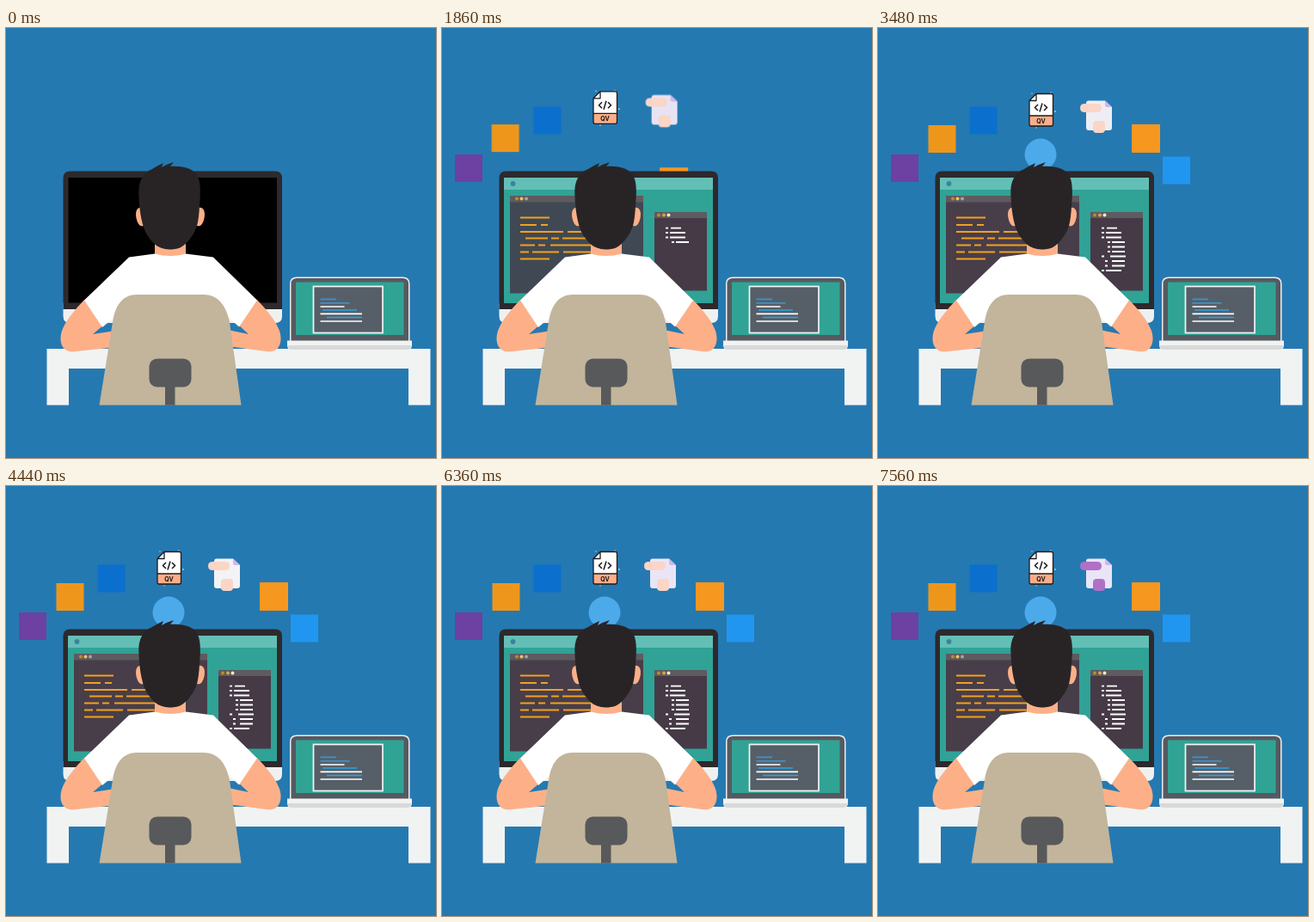
Write an HTML page that moves like this. It is 500 px wide and 500 px high and loops after 7620 ms.

```html
<!DOCTYPE html>
<html lang="en">
<head>
<meta charset="utf-8">
<title>Developer at a desk</title>
<style>
  html, body { margin: 0; width: 100%; height: 100%; overflow: hidden; background: #2579b1; }
  svg { display: block; width: 100vw; height: 100vh; }

  .loop, .icon { animation: 7620ms linear infinite; }

  /* Screen content */
  .desktop { animation-name: wake; }
  .win { transform-box: fill-box; transform-origin: center; }
  .left { animation-name: open-left; }
  .right { animation-name: open-right; }
  .code { animation-name: scroll-up; stroke: #f3a01f; stroke-width: 2; fill: none; }
  .dim { animation-name: colour-in; }
  .pane { animation-name: tint; }
  .typed { animation-name: type; animation-timing-function: steps(10); fill: none; stroke: #fff; stroke-width: 2; }

  @keyframes wake { 0%, 1.6% { opacity: 0 } 5.5%, 100% { opacity: 1 } }
  @keyframes open-left {
    0%, 3.9% { opacity: 0; transform: scale(.6) }
    8%, 100% { opacity: 1; transform: none }
  }
  @keyframes open-right {
    0%, 7% { opacity: 0; transform: scale(.6) }
    11%, 100% { opacity: 1; transform: none }
  }
  @keyframes scroll-up {
    0%, 10% { opacity: 0; transform: translateY(40px) }
    16.7%, 100% { opacity: 1; transform: none }
  }
  @keyframes colour-in { 0%, 14.5% { stroke: #bdb6ac } 19%, 100% { stroke: #f3a01f } }
  @keyframes tint { 0%, 15% { fill: #444a50 } 34% { fill: #3c4856 } 45%, 100% { fill: #483e4a } }
  @keyframes type { 0%, 20% { clip-path: inset(0 0 100% 0) } 31%, 100% { clip-path: inset(0) } }

  /* Icons spring out from behind the monitor: --x, --y point back to the start */
  .icon { --x: 0px; --y: 80px; }
  .i1 { --x: 90px; --y: 55px; animation-name: fly1; }
  .i2 { --x: 56px; --y: 56px; animation-name: fly2; }
  .i3 { --x: 45px; --y: 78px; animation-name: fly3; }
  .i4 { animation-name: fly4; }
  .i5 { --x: -20px; animation-name: fly5; }
  .i6 { --x: -50px; --y: 60px; animation-name: fly6; }
  .i7 { --x: -85px; --y: 50px; animation-name: fly7; }
  .i8 { animation-name: fly7; }

  /* Shared poses */
  .icon {
    --start: translate(var(--x), var(--y));
    --pass: translate(calc(var(--x) * -.08), calc(var(--y) * -.08));
    --peak: translate(calc(var(--x) * -.17), calc(var(--y) * -.17));
    --back: translate(calc(var(--x) * .03), calc(var(--y) * .03));
    --swing: translate(calc(var(--x) * -.03), calc(var(--y) * -.03));
  }
  @keyframes fly1 {
    0%, 11.4% { transform: var(--start); visibility: hidden }
    11.5% { visibility: visible }
    14.2% { transform: var(--pass) } 15% { transform: var(--peak) }
    18.4% { transform: var(--back) } 22.3% { transform: var(--swing) }
    24.4%, 100% { transform: translate(0, 0); visibility: visible }
  }
  @keyframes fly2 {
    0%, 12.5% { transform: var(--start); visibility: hidden }
    12.6% { visibility: visible }
    15.3% { transform: var(--pass) } 16.1% { transform: var(--peak) }
    19.5% { transform: var(--back) } 23.4% { transform: var(--swing) }
    25.5%, 100% { transform: translate(0, 0); visibility: visible }
  }
  @keyframes fly3 {
    0%, 15.5% { transform: var(--start); visibility: hidden }
    15.6% { visibility: visible }
    18.3% { transform: var(--pass) } 19.1% { transform: var(--peak) }
    22.5% { transform: var(--back) } 26.4% { transform: var(--swing) }
    28.5%, 100% { transform: translate(0, 0); visibility: visible }
  }
  @keyframes fly4 {
    0%, 18.5% { transform: var(--start); visibility: hidden }
    18.6% { visibility: visible }
    21.3% { transform: var(--pass) } 22.1% { transform: var(--peak) }
    25.5% { transform: var(--back) } 29.4% { transform: var(--swing) }
    31.5%, 100% { transform: translate(0, 0); visibility: visible }
  }
  @keyframes fly5 {
    0%, 21.6% { transform: var(--start); visibility: hidden }
    21.7% { visibility: visible }
    24.4% { transform: var(--pass) } 25.2% { transform: var(--peak) }
    28.6% { transform: var(--back) } 31.5% { transform: var(--swing) }
    33%, 100% { transform: translate(0, 0); visibility: visible }
  }
  @keyframes fly6 {
    0%, 24% { transform: var(--start); visibility: hidden }
    24.1% { visibility: visible }
    26.8% { transform: var(--pass) } 27.6% { transform: var(--peak) }
    30.5% { transform: var(--back) } 32.5% { transform: var(--swing) }
    33.6%, 100% { transform: translate(0, 0); visibility: visible }
  }
  @keyframes fly7 {
    0%, 31.1% { transform: var(--start); visibility: hidden }
    31.2% { visibility: visible }
    33.9% { transform: var(--pass) } 34.7% { transform: var(--peak) }
    38.1% { transform: var(--back) } 40.5% { transform: var(--swing) }
    42%, 100% { transform: translate(0, 0); visibility: visible }
  }

  .tag { animation-name: tag; }
  .sheet { animation-name: sheet; }
  @keyframes tag {
    0%, 70% { fill: #fbd5c6; stroke: #fbd5c6 }
    72%, 76% { fill: #fbd0bd; stroke: #b98ad8 }
    80%, 94% { fill: #fbd5c6; stroke: #fbd5c6 }
    97%, 100% { fill: #b070c8; stroke: #b070c8 }
  }
  @keyframes sheet {
    0%, 36% { fill: #e7e3f3 } 50%, 62% { fill: #f3f2f4 }
    72% { fill: #ece8f6 } 84%, 100% { fill: #e9e5f6 }
  }
</style>
</head>
<body>
<svg viewBox="0 0 500 500">
  <rect width="500" height="500" fill="#2579b1"/>

  <!-- Icons -->
  <rect class="icon i1" x="15" y="147" width="32" height="32" fill="#6c41a2"/>
  <rect class="icon i2" x="58.5" y="113" width="32" height="32" fill="#ee961b"/>
  <rect class="icon i3" x="106.5" y="91.5" width="32" height="32" fill="#0b70cd"/>
  <g class="icon i4">
    <path d="M184 76.500H201.500q2 0 2 2V112q0 2-2 2H178q-2 0-2-2V84.500Z" fill="#fff"/>
    <path d="M176 102H203.500V112q0 2-2 2H178q-2 0-2-2Z" fill="#fcae88"/>
    <path d="M184 76.500H201.500q2 0 2 2V112q0 2-2 2H178q-2 0-2-2V84.500ZV84.500H176M176 102H203.500" fill="none" stroke="#1d1b1c" stroke-width="1.3" stroke-linejoin="round"/>
    <path d="M186 89l-3.500 3.500 3.500 3.500M193 89l3.500 3.500-3.500 3.500M191 87.500l-3 10" fill="none" stroke="#1d1b1c" stroke-width="1.5"/>
    <text x="189.500" y="111" text-anchor="middle" font-family="Inter, Arial, sans-serif" font-weight="700" font-size="7" fill="#1d1b1c">QV</text>
    <g fill="#e9b98f">
      <circle cx="179" cy="76" r=".8"/><circle cx="206" cy="97" r="1"/>
      <circle cx="184" cy="116" r=".8"/><circle cx="201" cy="75" r=".7"/>
    </g>
  </g>
  <g class="icon i5">
    <path class="loop sheet" d="M245 84.500H264L272 92V116q0 3-3 3H245q-3 0-3-3V87.500q0-3 3-3Z"/>
    <path d="M264 84.500L272 92H266q-2 0-2-2Z" fill="#cbb9ea"/>
    <rect class="loop tag" x="235.5" y="88.5" width="24" height="9" rx="4"/>
    <rect class="loop tag" x="250.5" y="108.5" width="13" height="13" rx="3"/>
  </g>
  <rect class="icon i6" x="295" y="112" width="33" height="33" fill="#f6971f"/>
  <rect class="icon i7" x="331" y="149.5" width="32" height="32" fill="#2196f0"/>
  <circle class="icon i8" cx="189" cy="147" r="18.5" fill="#4ca9ea"/>

  <!-- Monitor -->
  <path d="M66.500 320H321V335q0 8-8 8H74.500q-8 0-8-8Z" fill="#eff1f1"/>
  <path d="M74.500 166.500H313q8 0 8 8V327H66.500V174.500q0-8 8-8Z" fill="#2d292c"/>
  <rect x="72.5" y="174" width="242.500" height="145.500" fill="#000"/>
  <g class="loop desktop">
    <rect x="72" y="174" width="243" height="146" fill="#30a296"/>
    <rect x="72" y="174" width="243" height="14" fill="#63bfb6"/>
    <circle cx="82.5" cy="181" r="2.900" fill="#3b829a"/>
    <g class="loop win left">
      <rect class="loop pane" x="79" y="195" width="155" height="113.500"/>
      <rect x="79" y="195" width="155" height="7.500" fill="#5d5b5f"/>
      <circle cx="87" cy="198.5" r="2" fill="#c98624"/>
      <circle cx="92.5" cy="198.5" r="2" fill="#f0bf66"/>
      <circle cx="98" cy="198.5" r="2" fill="#aaa39c"/>
      <g class="loop code">
        <path class="loop dim" d="M91 220.500h34M91 229h19M91 237h50M97 244.500h26M127 244.500h9M91 268.500h34"/>
        <path d="M115 229h8M146 237h28M140 244.500h34M91 252.500h17M112 252.500h8M126 252.500h48M91 260.500h10M105 260.500h31M141 260.500h32"/>
      </g>
    </g>
    <g class="loop win right">
      <rect x="247" y="214" width="61" height="91.500" fill="#463a47"/>
      <rect x="247" y="214" width="61" height="7" fill="#5d5b5f"/>
      <circle cx="252" cy="217.5" r="2" fill="#c98624"/>
      <circle cx="258" cy="217.5" r="2" fill="#d9a24c"/>
      <circle cx="263.5" cy="217.5" r="2" fill="#f6e6c8"/>
      <path class="loop typed" d="M260 232.500h3M266 232.500h12M260 238h3M265 238h18M260 243.500h3M265 243.500h18M267 249h3M272 249h15M267 254.500h3M272 254.500h15M267 260h3M272 260h15M260 265.500h3M270 265.500h18M264 271h3M272 271h15M264 276.500h3M272 276.500h15M260 282h3M265 282h18"/>
    </g>
  </g>

  <!-- Desk -->
  <path d="M47.500 373H493.500V438.600H468V396H73V438.600H47.500Z" fill="#f1f3f3"/>

  <!-- Laptop -->
  <path d="M338 289.500H461.500q8 0 8 8V366H330V297.500q0-8 8-8Z" fill="#eceeef"/>
  <path d="M338 291H461.500q6.500 0 6.500 6.500V364H331.500V297.500q0-6.500 6.500-6.500Z" fill="#555a61"/>
  <rect x="337" y="295.5" width="125.500" height="61.500" fill="#31a395"/>
  <rect x="357.5" y="300.5" width="80.500" height="54" fill="#565f68" stroke="#f4f6f6" stroke-width="1.700"/>
  <g fill="none" stroke-width="1.700">
    <path d="M365.500 315.300h18.500M365.500 319.800h34" stroke="#4190c4"/>
    <path d="M368 328h40M373 336.500h41" stroke="#29a3e6"/>
    <path d="M365.500 324h28M365.500 332.300h48.500M365.500 341h48.500" stroke="#fff"/>
  </g>
  <path d="M327 363.500H472V369q0 5-5 5H332q-5 0-5-5Z" fill="#f1f2f2"/>
  <path d="M327.500 369H471.500q-1 5-5 5H332q-4 0-4.500-5Z" fill="#d8dada"/>

  <!-- Arms, neck and shirt -->
  <g fill="#fdb088">
    <path d="M91 316C80 328 70 339 65 352C61 365 65 376 77 376.500L124 371.500V352.500L101 356L114 345Z"/>
    <path d="M292 316C303 328 313 339 318 352C322 365 318 376 306 376.500L258 370V351L282 356L269 344Z"/>
    <path d="M173 242H209V264Q191 269 173 264Z"/>
    <path d="M159 209C152 207 150 214 151.500 221C153 228 156 231.500 160 230Z"/>
    <path d="M223 209C230 207 232 214 230.500 221C229 228 226 231.500 222 230Z"/>
  </g>
  <path d="M143 266.500L173 262.500Q191 267.500 209 262.500L241 266.500L292 316.500L271 347.500L258 336V350H124V338L112 348L91 316.500Z" fill="#fff"/>

  <!-- Hair -->
  <path d="M154.500 195C153 178 160 168 169 164.500Q176 160 183 157L181 162Q188 158 195 156L191 161C207 160 219 164 223 173C227 181 226 196 225 207C224 226 222 235 214 245C206 256 199 257.500 190 257.500C176 257.500 168 248 162 237C157 225 155 210 154.500 195Z" fill="#282426"/>

  <!-- Chair -->
  <path d="M108.500 438.600L124 342C127 322 136 310 152 310H230C246 310 256 322 260 342L273.500 438.600Z" fill="#c2b59b"/>
  <rect x="185" y="412" width="11.500" height="26.600" fill="#58595b"/>
  <rect x="166.5" y="384.5" width="49" height="33" rx="9" fill="#58595b"/>
</svg>
</body>
</html>
```
